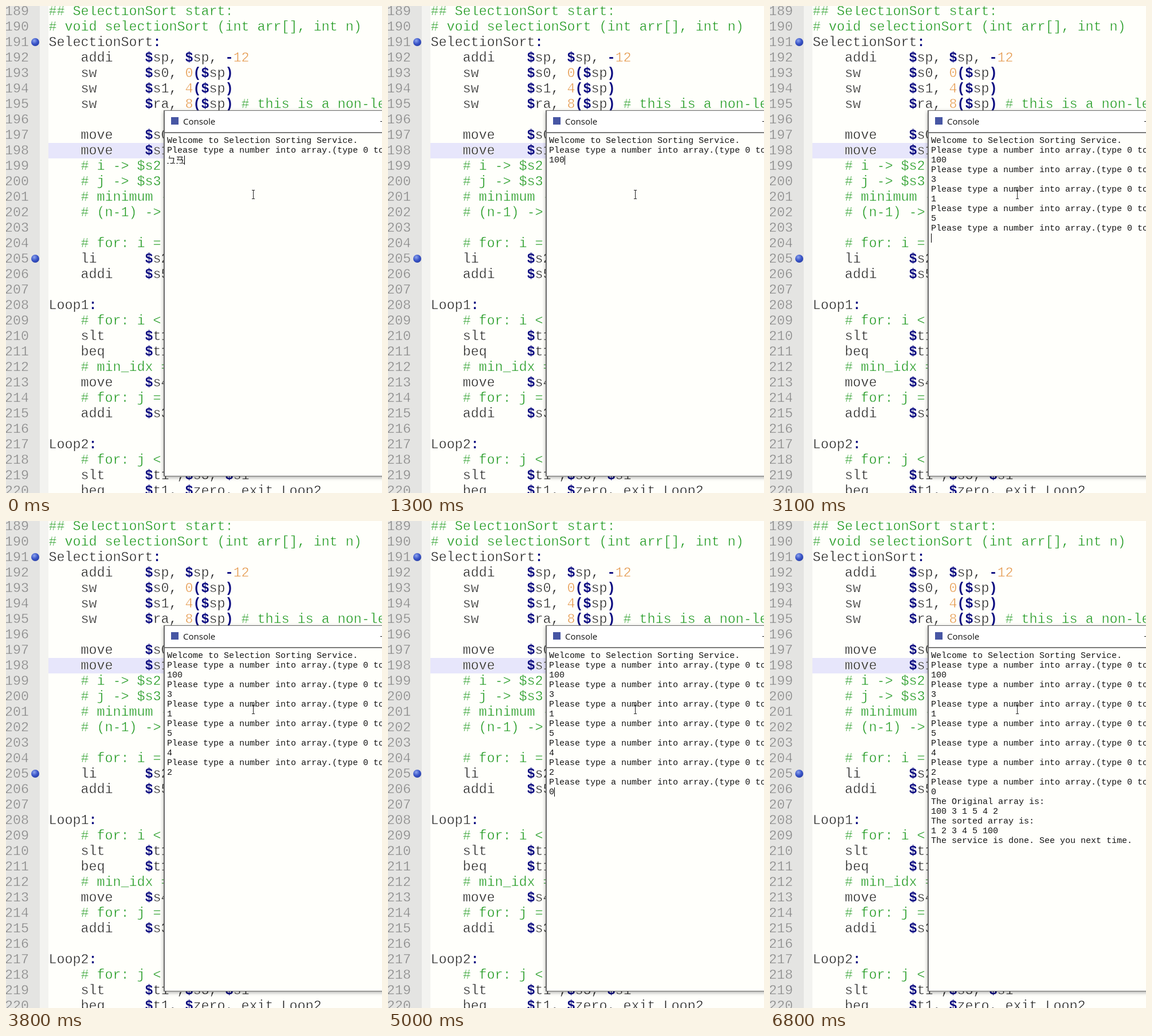
An HTML page that plays this animation: 656 px wide and 850 px high, repeating every 6.9 s.

```html
<!DOCTYPE html>
<html lang="en">
<head>
<meta charset="utf-8">
<title>Selection sort in a console</title>
<style>
html, body { margin: 0; width: 100%; height: 100%; overflow: hidden; background: #fffffb; }
#stage { position: relative; width: 656px; height: 850px; overflow: hidden; background: #fffffb; }
#stage > *, #win > * { position: absolute; }
pre { margin: 0; font-family: "Liberation Mono", monospace; white-space: pre; }
#gutter { left: 0; top: 0; width: 59px; height: 850px; background: #e4e4e2; }
#fold { left: 59px; top: 0; width: 15px; height: 850px; background: #f3f3f0; }
#row { left: 74px; top: 239px; width: 582px; height: 27px; background: #e7e6fb; }
/* A hairline in the paper colour thins the letters */
#nums, #code { top: -3px; font-size: 23.33px; line-height: 27px; -webkit-text-stroke: .5px #fffffb; }
#nums { left: -2px; color: #868686; -webkit-text-stroke-color: #e4e4e2; }
#code { left: 74.5px; color: #222; }
#code b { color: #0a0a80; -webkit-text-stroke: 0; }
#code i { font-style: normal; color: #e5994c; }
#code u { text-decoration: none; color: #1c981c; }
.dot { left: 44px; width: 14px; height: 14px; border-radius: 50%;
  background: radial-gradient(circle at 38% 32%, #8da4ee, #3a55c8 45%, #1c3093); }
#win { left: 275px; top: 182px; width: 420px; height: 639px; box-sizing: border-box;
  border: 1px solid #6c6c6c; border-left-width: 2px; background: #fffffb;
  box-shadow: 0 2px 6px rgba(0,0,0,.35); }
#bar { left: 0; top: 0; width: 100%; height: 37px; background: #fff; border-bottom: 2px solid #7a7a7a; }
#icon { left: 11px; top: 11px; width: 13px; height: 13px; background: #4756a4; }
#title { left: 32px; top: 7px; font: 15px/22px "Open Sans", "Noto Sans", sans-serif; color: #111; }
#min { left: 376px; top: 18px; width: 10px; height: 1px; background: #222; }
#out { left: 4px; top: 44px; font-size: 15px; line-height: 17px; color: #151515; }
.ime { display: inline-block; height: 13px; vertical-align: top; border-bottom: 1px dashed #222;
  font: 15px/14px "Noto Sans CJK TC", "Noto Sans CJK JP", sans-serif; }
.caret { display: inline-block; width: 1px; height: 16px; vertical-align: top; background: #000; }
#mouse { left: 428px; top: 321px; }
</style>
</head>
<body>
<div id="stage">
  <div id="gutter"></div>
  <div id="fold"></div>
  <div id="row"></div>
  <pre id="nums"></pre>
  <pre id="code"></pre>
  <div class="dot" style="top:56px"></div>
  <div class="dot" style="top:434px"></div>
  <div id="win">
    <div id="bar"></div>
    <div id="icon"></div>
    <div id="title">Console</div>
    <div id="min"></div>
    <pre id="out"></pre>
  </div>
  <svg id="mouse" width="8" height="17" fill="none" stroke="#222">
    <path d="M1 .5H3.5V15.5H1M6 .5H3.5M6 15.5H3.5"/>
  </svg>
</div>
<script>
const source = `## SelectionSort start:
# void selectionSort (int arr[], int n)
SelectionSort:
    addi    $sp, $sp, -12
    sw      $s0, 0($sp)
    sw      $s1, 4($sp)
    sw      $ra, 8($sp) # this is a non-leaf

    move    $s0, $a0
    move    $s1, $a1
    # i -> $s2
    # j -> $s3
    # minimum -> $s4
    # (n-1) -> $s5

    # for: i = 0
    li      $s2, 0
    addi    $s5, $s1, -1

Loop1:
    # for: i < (n-1)
    slt     $t1, $s2, $s5
    beq     $t1, $zero, exit_Loop1
    # min_idx = i
    move    $s4, $s2
    # for: j = i+1
    addi    $s3, $s2, 1

Loop2:
    # for: j < n
    slt     $t1 ,$s3, $s1
    beq     $t1, $zero, exit_Loop2`.split("\n");

const $ = id => document.getElementById(id);

function highlight(line) {
  const [, code, comment] = line.match(/^([^#]*)(.*)$/);
  return code.replace(/[$():-]|\b\d+/g, s => /\d/.test(s) ? `<i>${s}</i>` : `<b>${s}</b>`)
    + `<u>${comment.replace(/</g, "&lt;")}</u>`;
}

$("nums").textContent = source.map((_, i) => 189 + i).join("\n");
$("code").innerHTML = source.map(highlight).join("\n");

const LOOP = 6900, DONE = 5200;
const prompt = "Please type a number into array.(type 0 to stop)\n";
const ending = `The Original array is:
100 3 1 5 4 2
The sorted array is:
1 2 3 4 5 100
The service is done. See you next time.`;

// Time of each key press in ms
const keys = [
  [900, "1"], [1000, "0"], [1100, "0"], [1500, "\n"],
  [1900, "3"], [2200, "\n"], [2500, "1"], [2700, "\n"],
  [2900, "5"], [3100, "\n"], [3300, "4"], [3500, "\n"],
  [3700, "2"], [4100, "\n"], [4900, "0"], [DONE, "\n"]
];

function consoleAt(t) {
  let text = "Welcome to Selection Sorting Service.\n" + prompt;
  for (const [time, key] of keys) {
    if (t < time) break;
    text += key;
    if (key === "\n") text += time < DONE ? prompt : ending;
  }
  const ime = t < 400 ? "ㄅㄢ" : t < 500 ? "ㄅ" : "";
  if (ime) text += `<span class="ime">${ime}</span>`;
  if (t < DONE && t % 1000 < 550) text += '<span class="caret"></span>';
  return text;
}

let shown;
function draw() {
  const html = consoleAt(performance.now() % LOOP);
  if (html !== shown) $("out").innerHTML = shown = html;
  requestAnimationFrame(draw);
}
draw();
</script>
</body>
</html>
```
